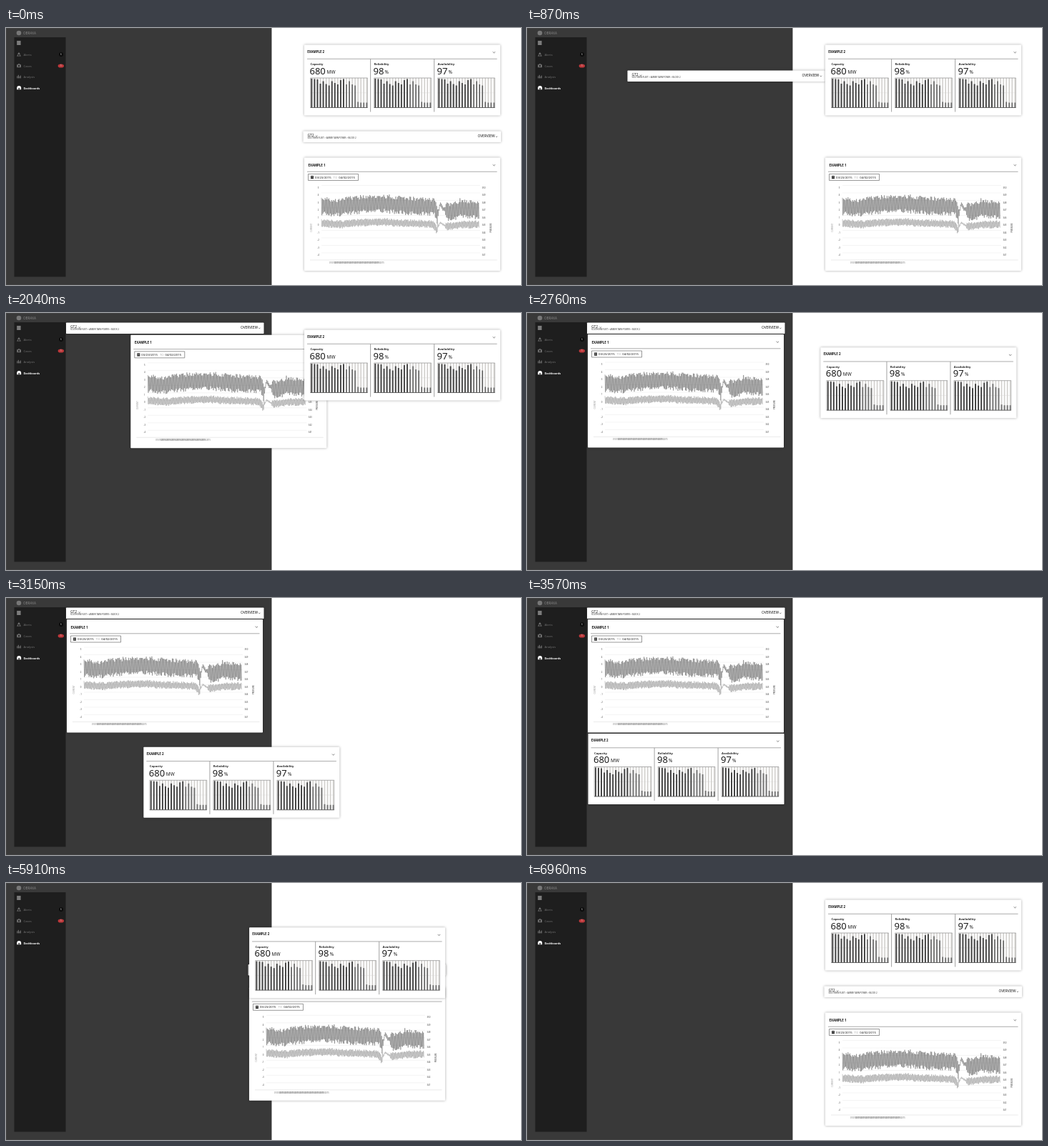
These frames come from a looping animation (720 px wide and 360 px high, 7230 ms). An HTML page with a canvas:

```html
<!DOCTYPE html>
<html lang="en">
<head>
<meta charset="utf-8">
<title>Dashboard assembly</title>
<style>
  html, body { margin: 0; width: 100%; height: 100%; overflow: hidden; background: #fff; }
  canvas { display: block; width: 720px; height: 360px; }
</style>
</head>
<body>
<canvas id="stage"></canvas>
<script>
const LOOP = 7230, STEP = 30;
const canvas = document.getElementById('stage');
const ctx = canvas.getContext('2d');
const dpr = window.devicePixelRatio || 1;
canvas.width = 720 * dpr;
canvas.height = 360 * dpr;

// ---------- drawing helpers ----------
function text(str, x, y, size, color = '#1c1c1c', weight = 400, align = 'left') {
  ctx.font = `${weight} ${size}px "Noto Sans", "Open Sans", sans-serif`;
  ctx.textAlign = align;
  ctx.fillStyle = color;
  ctx.fillText(str, x, y);
}

function rect(x, y, w, h, color) {
  ctx.fillStyle = color;
  ctx.fillRect(x, y, w, h);
}

function line(points, color, width = 0.6) {
  ctx.beginPath();
  points.forEach(([x, y]) => ctx.lineTo(x, y));
  ctx.strokeStyle = color;
  ctx.lineWidth = width;
  ctx.lineJoin = 'bevel';
  ctx.stroke();
}

function blob(x, y, rx, ry, color) {
  ctx.beginPath();
  ctx.ellipse(x, y, rx, ry, 0, 0, Math.PI * 2);
  ctx.fillStyle = color;
  ctx.fill();
}

function poly(points, color) {
  ctx.beginPath();
  points.forEach(([x, y]) => ctx.lineTo(x, y));
  ctx.fillStyle = color;
  ctx.fill();
}

const chevron = (x, y, r = 1.7) =>
  line([[x - r, y - r / 2], [x, y + r / 2], [x + r, y - r / 2]], '#444', 0.7);

function sideText(str, x, y, color) {
  ctx.save();
  ctx.translate(x, y);
  ctx.rotate(-Math.PI / 2);
  text(str, 0, 0, 2.7, color, 400, 'center');
  ctx.restore();
}

function card(w, h) {
  ctx.save();
  ctx.shadowColor = 'rgba(0,0,0,.36)';
  ctx.shadowBlur = 3.5 * dpr;
  ctx.beginPath();
  ctx.roundRect(0, 0, w, h, 0.8);
  ctx.fillStyle = '#fff';
  ctx.fill();
  ctx.restore();
}

function cardHead(title, x, y) {
  text(title, x, y, 4.4, '#111', 700);
  chevron(265.3, 10.6);
  line([[4, 19.8], [269.5, 19.8]], '#888', 0.7);
}

// ---------- chart data ----------
const noise = n => { const v = Math.sin(n * 127.1) * 43758.5453; return v - Math.floor(v); };

function lerpPoints(points, x) {
  const i = Math.max(1, points.findIndex(p => p[0] >= x));
  const [x0, y0] = points[i - 1], [x1, y1] = points[i];
  return y0 + (y1 - y0) * (x - x0) / (x1 - x0);
}

function zigzag(mid, amp, seed) {
  const out = [];
  for (let i = 0; i < 340; i++) {
    const x = 24 + i * 0.65;
    const calm = x > 187 && x < 197 ? 0.25 : 1;
    const swing = amp * calm * (0.62 + 0.55 * noise(i + seed));
    out.push([x, lerpPoints(mid, x) + (i % 2 ? swing : -swing)]);
  }
  return out;
}

const upper = zigzag([[24, 68], [50, 70.5], [62, 67], [105, 64], [130, 66], [150, 68], [178, 69],
  [183, 70], [186.5, 82], [190, 64], [194, 72], [198, 72], [200, 76], [212, 74],
  [218, 70], [232, 73], [245, 73]], 11.5, 3);
const lower = zigzag([[24, 92], [54, 93.5], [62, 92], [105, 90], [140, 92], [180, 93],
  [185, 101], [190, 91], [196, 95], [200, 96.5], [220, 93.5], [245, 93.5]], 5, 411);

const barTops = [1, 1.5, 2, 8, 4.5, 8.5, 10.5, 4.5, 7, 9, 3, 1.5, 9, 4.5, 9, 10.5, 33.5, 34.5, 34.5, 34.5];
const gauges = [['Capacity', '680', 'MW'], ['Reliability', '98', '%'], ['Availability', '97', '%']];

// ---------- cards ----------
function drawBar() {
  card(276.5, 15.5);
  text('GT2', 6, 7.3, 4.9);
  chevron(18.7, 6.6, 1.2);
  text('SOUTHERN FLEET > AMBER TARN POWER > BLOCK 2', 6, 10.8, 2.8, '#333');
  text('OVERVIEW', 244, 8.7, 4.8, '#111');
  chevron(270.3, 7.8, 1.2);
}

function drawTrend() {
  card(274, 158.5);
  cardHead('EXAMPLE 1', 5.5, 12.5);

  ctx.strokeStyle = '#555';
  ctx.lineWidth = 0.6;
  ctx.strokeRect(5.5, 23, 70, 9);
  rect(9, 25.5, 4, 4.2, '#333');
  rect(9.6, 27, 2.8, 0.5, '#fff');
  text('03/23/2015', 15, 29.1, 4.25);
  text('TO', 40.6, 29.1, 4.25, '#aaa');
  text('04/02/2015', 48.2, 29.1, 4.25);

  for (let i = 0; i < 10; i++) {
    const y = 39 + i * 10.5;
    line([[24, y], [246, y]], '#e8e8e8', 0.5);
    text(5 - i, 19.5, y + 4, 2.8, '#444', 400, 'center');
    text(350 - i, 248.5, y + 4, 2.8, '#444');
  }
  sideText('CURRENT', 10.6, 98.5, '#999');
  sideText('PRESSURE', 262.2, 98.5, '#333');
  line(lower, '#999', 0.5);
  line(upper, '#666', 0.5);

  line([[8, 143.5], [269.5, 143.5]], '#ddd', 0.6);
  for (let i = 0; i < 10; i++) text('01/01/2015', 35 + i * 7, 148.3, 2.6, '#666');
}

function drawGauge([label, value, unit], x) {
  text(label, x + 8.5, 28.6, 4.2, '#222', 700);
  text(value, x + 7.5, 41.2, 13);
  text(unit, x + (value.length > 2 ? 31.5 : 23.6), 40.2, 6.5);

  const left = x + 8.5, top = 46.5, height = 41.5;
  line([[left, top + height / 2], [left + 80, top + height / 2]], '#ddd', 0.5);
  barTops.forEach((y, i) => {
    const bx = left + 0.9 + i * 4.05;
    rect(bx + 0.2, top, 1.5, height, '#d0cecb');
    rect(bx, top + y, 1.9, height - y, i < 12 ? '#404040' : '#747474');
  });
  line([[left, top], [left + 80, top]], '#999', 0.8);
  line([[left, top], [left, top + height]], '#888', 0.5);
  line([[left + 80, top], [left + 80, top + height]], '#888', 0.5);
  line([[left, top + height], [left + 80, top + height]], '#555', 0.9);
}

function drawGauges() {
  card(274, 99);
  cardHead('EXAMPLE 2', 4.2, 11.2);
  gauges.forEach((g, i) => drawGauge(g, i * 89));
  for (const x of [92.6, 181.6]) line([[x, 20], [x, 94]], '#666', 0.6);
}

// ---------- shell ----------
function drawShell() {
  rect(0, 0, 720, 360, '#fff');
  rect(0, 0, 371.5, 360, '#4a4a4a');
  rect(0.5, 0.5, 370.5, 359, '#393939');
  rect(11.5, 13, 72, 335.5, '#1e1e1e');
  blob(18, 7, 3.3, 3.3, '#777');
  text('OBRAXA', 24, 8.7, 4.6, '#858585');

  for (const y of [18.9, 20.9, 22.9]) line([[15.2, y], [20.6, y]], '#eee', 0.9);

  const dim = '#707070';
  poly([[18, 33.8], [20, 37], [16, 37]], dim);
  poly([[16.5, 37.2], [18, 39.6], [15, 39.6]], dim);
  poly([[19.5, 37.2], [21, 39.6], [18, 39.6]], dim);
  text('Alerts', 24.6, 38.6, 4.1, dim);
  blob(77, 37, 3, 3, '#0c0c0c');
  text('6', 77, 38.2, 3.2, '#ddd', 400, 'center');

  rect(15.2, 51.2, 5.8, 4, dim);
  rect(16.8, 50.2, 2.6, 1, dim);
  blob(18.1, 53.2, 1.1, 1.1, '#1e1e1e');
  text('Cases', 24.6, 54.7, 4.1, dim);
  blob(76.8, 53, 4.2, 2.6, '#bd383b');
  text('1', 76.8, 54.2, 3.2, '#fff', 400, 'center');

  [3, 4.6, 2.6, 3.8].forEach((h, i) => rect(15.3 + i * 1.5, 70.4 - h, 1.1, h, dim));
  text('Analysis', 24.6, 69.7, 4.1, dim);

  ctx.beginPath();
  ctx.arc(18.2, 84, 3, Math.PI, 0);
  ctx.lineTo(21.2, 86.3);
  ctx.lineTo(15.2, 86.3);
  ctx.fillStyle = '#fff';
  ctx.fill();
  rect(17.5, 84, 1.4, 2.3, '#1e1e1e');
  text('Dashboards', 24.5, 85.5, 3.85, '#fff', 700);
}

// ---------- motion ----------
const clamp = u => Math.min(1, Math.max(0, u));
const inOut = power => u => u < 0.5 ? (2 * u) ** power / 2 : 1 - (2 - 2 * u) ** power / 2;
const quad = inOut(2), cubic = inOut(3);

function glide(u) {   // cubic-bezier(.45, 0, .3, 1)
  let lo = 0, hi = 1;
  for (let i = 0; i < 24; i++) {
    const p = (lo + hi) / 2, q = 1 - p;
    if (3 * q * q * p * 0.45 + 3 * q * p * p * 0.3 + p ** 3 < u) lo = p; else hi = p;
  }
  return 3 * (1 - lo) * lo * lo + lo ** 3;
}

// Each card flies along a quadratic arc (bend, shift are offsets from home).
const cards = [
  { draw: drawBar, home: [415.5, 144.5], bend: [-218, -18], shift: [-331.5, -131],
    start: 130, time: 1200, ease: cubic },
  { draw: drawTrend, home: [417, 181.5], bend: [-115, -170], shift: [-332, -151.5],
    start: 1445, time: 887, ease: quad },
  { draw: drawGauges, home: [417, 23.5], bend: [-58, 245], shift: [-331.5, 166.5],
    start: 2610, time: 960, ease: glide }
];
const RETURN = 5310, RETURN_TIME = 910;

function place(c, t) {
  const back = t >= RETURN;
  const s = back ? 1 - quad(clamp((t - RETURN) / RETURN_TIME)) : c.ease(clamp((t - c.start) / c.time));
  return c.home.map((h, i) =>
    h + (back ? s * c.shift[i] : 2 * s * (1 - s) * c.bend[i] + s * s * c.shift[i]));
}

let origin;
function frame(now) {
  origin ??= now;
  const t = Math.floor((now - origin) % LOOP / STEP) * STEP;
  ctx.setTransform(dpr, 0, 0, dpr, 0, 0);
  drawShell();
  for (const c of cards) {
    ctx.save();
    ctx.translate(...place(c, t));
    c.draw();
    ctx.restore();
  }
  requestAnimationFrame(frame);
}
requestAnimationFrame(frame);
</script>
</body>
</html>
```
